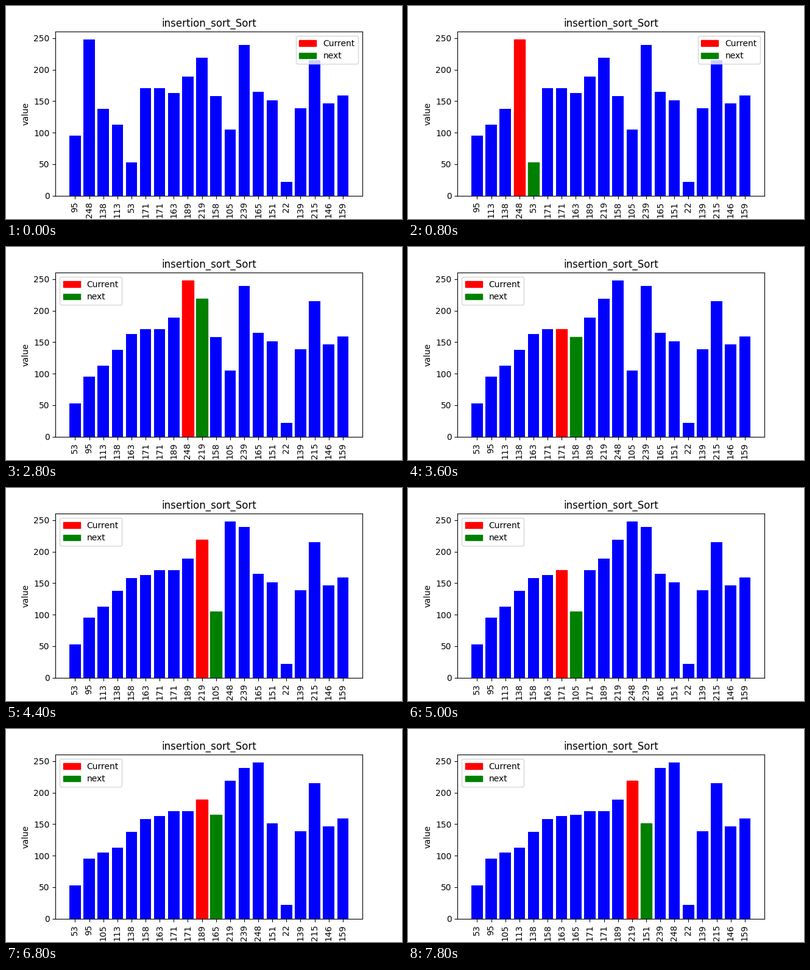
Recreate the animation shown at these times as a matplotlib script. Size 650 by 350 pixels, loop 8 s.

```python
import matplotlib.pyplot as plt
from matplotlib.animation import FuncAnimation
from matplotlib.patches import Patch

VALUES = [95, 248, 138, 113, 53, 171, 171, 163, 189, 219,
          158, 105, 239, 165, 151, 22, 139, 215, 146, 159]
FRAMES = 40
INTERVAL = 200


def insertion_sort(values):
    """Yield the list and the left index of the pair about to be swapped."""
    a = list(values)
    yield list(a), None
    for i in range(1, len(a)):
        j = i
        while j > 0 and a[j - 1] > a[j]:
            yield list(a), j - 1
            a[j - 1], a[j] = a[j], a[j - 1]
            j -= 1


steps = [step for step, _ in zip(insertion_sort(VALUES), range(FRAMES))]

plt.rcParams["font.family"] = "DejaVu Sans"
fig, ax = plt.subplots(figsize=(6.5, 3.5), dpi=100)
handles = [Patch(color="red", label="Current"),
           Patch(color="green", label="next")]


def draw(n):
    values, pos = steps[n]
    ax.clear()
    bars = ax.bar(range(len(values)), values, color="blue")
    if pos is not None:
        bars[pos].set_color("red")
        bars[pos + 1].set_color("green")
    ax.set_xticks(range(len(values)), values, rotation="vertical")
    ax.set_ylabel("value")
    ax.set_title("insertion_sort_Sort")
    ax.legend(handles=handles, loc="best")
    return list(bars)


anim = FuncAnimation(fig, draw, frames=FRAMES, interval=INTERVAL,
                     repeat=True, repeat_delay=0)
plt.show()
```
